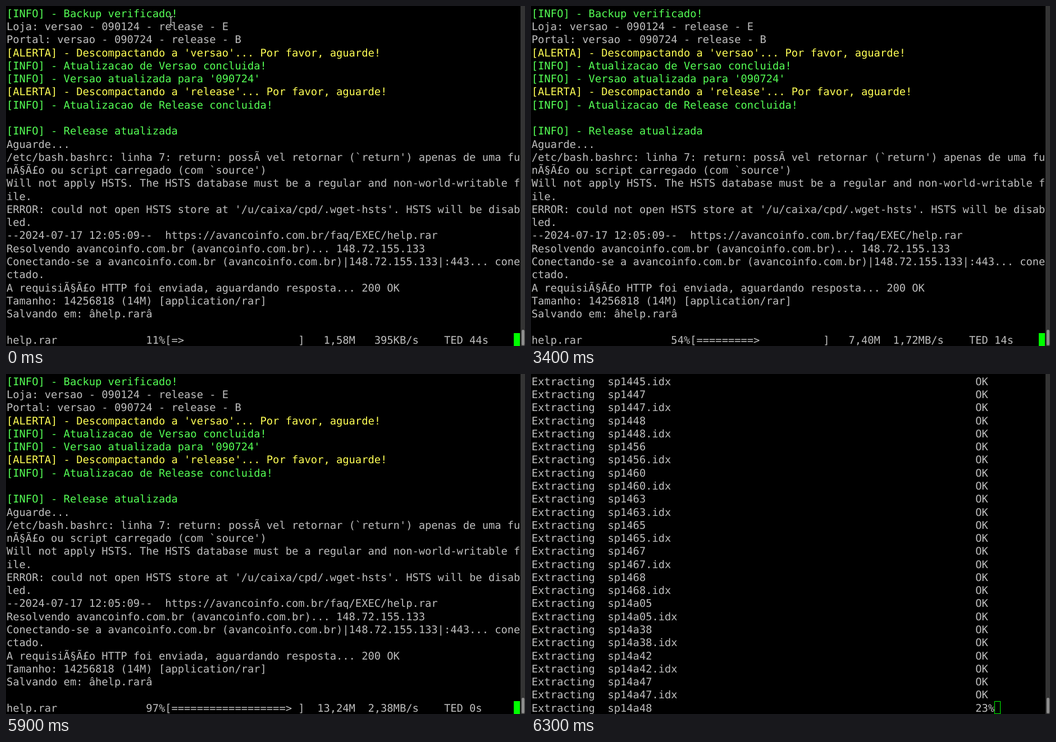
These frames come from a looping animation (924 px wide and 606 px high, 6.4 s). An HTML page:

```html
<!DOCTYPE html>
<html lang="pt-BR">
<head>
<meta charset="utf-8">
<title>Terminal</title>
<style>
  html, body { margin: 0; width: 100%; height: 100%; overflow: hidden; background: #000; }
  svg { display: block; width: 924px; height: 606px; }
  text {
    font: 18.753px "DejaVu Sans Mono", "Noto Sans Mono", monospace;
    font-variant-ligatures: none;
    text-rendering: geometricPrecision;
    white-space: pre;
  }
</style>
</head>
<body>
<svg id="stage" viewBox="0 0 924 606">
  <rect width="924" height="606" fill="#000"/>
  <g id="rows"></g>
  <rect id="cursor" width="11.3" height="23"/>
  <rect x="916" width="8" height="606" fill="#343434"/>
  <rect x="918" y="577" width="5" height="28" rx="2.5" fill="#8e8e8e"/>
  <g id="pointer" fill="none">
    <path d="M289.5 18.5q3.5 0 4 2q.5-2 4-2M293.5 20v13M289.5 34.5q3.5 0 4-2q.5 2 4 2" stroke="#000" stroke-width="3"/>
    <path d="M289.5 18.5q3.5 0 4 2q.5-2 4-2M293.5 20v13M289.5 34.5q3.5 0 4-2q.5 2 4 2" stroke="#ddd" stroke-width="1.2"/>
  </g>
</svg>
<script>
const LOOP = 6400, ROWS = 26, CELL_W = 11.29, CELL_H = 23.28, LEFT = 1;
const TOTAL_MB = 13.596, BAR_WIDTH = 20;
const byId = id => document.getElementById(id);

const log = `[INFO] - Backup verificado!
Loja: versao - 090124 - release - E
Portal: versao - 090724 - release - B
[ALERTA] - Descompactando a 'versao'... Por favor, aguarde!
[INFO] - Atualizacao de Versao concluida!
[INFO] - Versao atualizada para '090724'
[ALERTA] - Descompactando a 'release'... Por favor, aguarde!
[INFO] - Atualizacao de Release concluida!

[INFO] - Release atualizada
Aguarde...
/etc/bash.bashrc: linha 7: return: possÃ vel retornar (\`return') apenas de uma fu
nÃ§Ã£o ou script carregado (com \`source')
Will not apply HSTS. The HSTS database must be a regular and non-world-writable f
ile.
ERROR: could not open HSTS store at '/u/caixa/cpd/.wget-hsts'. HSTS will be disab
led.
--2024-07-17 12:05:09--  https://avancoinfo.com.br/faq/EXEC/help.rar
Resolvendo avancoinfo.com.br (avancoinfo.com.br)... 148.72.155.133
Conectando-se a avancoinfo.com.br (avancoinfo.com.br)|148.72.155.133|:443... cone
ctado.
A requisiÃ§Ã£o HTTP foi enviada, aguardando resposta... 200 OK
Tamanho: 14256818 (14M) [application/rar]
Salvando em: âhelp.rarâ
`.split("\n");

// [start ms, megabytes received, speed]
const progress = [
  [0, 1.58, "395KB/s"], [200, 1.86, "456KB/s"], [500, 2.17, "523KB/s"],
  [800, 2.48, "597KB/s"], [1100, 2.83, "684KB/s"], [1500, 3.37, "831KB/s"],
  [1800, 3.89, "946KB/s"], [2100, 4.45, "1,07MB/s"], [2400, 5.06, "1,22MB/s"],
  [3400, 7.40, "1,72MB/s"], [3700, 7.92, "1,83MB/s"], [4000, 8.48, "1,94MB/s"],
  [4200, 9.06, "2,01MB/s"], [4500, 9.68, "2,08MB/s"], [4700, 10.24, "2,14MB/s"],
  [5000, 10.82, "2,19MB/s"], [5200, 11.41, "2,25MB/s"], [5500, 12.02, "2,29MB/s"],
  [5700, 12.63, "2,34MB/s"], [5900, 13.24, "2,38MB/s"]
];
const remaining = [[0, 44], [1100, 26], [2400, 14], [3700, 7], [4700, 3], [5900, 0]];

const range = (first, step) => Array.from({ length: 13 }, (_, i) => String(first + i * step));
// [start ms, previous archive, archives, percent]
const pages = [
  [6100, "1008", range(1010, 3), 7],
  [6200, "1226", range(1229, 4), 15],
  [6300, "1445", "1447 1448 1456 1460 1463 1465 1467 1468 14a05 14a38 14a42 14a47 14a48".split(" "), 23]
];

const latest = (list, t) => list.filter(([start]) => start <= t).pop();

function downloadLine(mb, speed, tail) {
  const share = Math.min(1, mb / TOTAL_MB);
  const bar = ">".padStart(Math.floor(share * BAR_WIDTH), "=");
  const size = mb.toFixed(2).replace(".", ",") + "M";
  return "help.rar".padEnd(21) + `${Math.floor(share * 100)}%`.padStart(4) +
    `[${bar.padEnd(BAR_WIDTH)}]  ${size.padStart(6)}${speed.padStart(10)}    ${tail}`;
}

function extractionLines([, previous, archives, percent]) {
  const names = [previous + ".idx", ...archives.flatMap(a => [a, a + ".idx"])].slice(0, ROWS);
  return names.map((name, i) =>
    ("Extracting  sp" + name).padEnd(70) + (i < ROWS - 1 ? "OK" : `${percent}%`.padStart(3)));
}

function screenAt(t) {
  if (t >= 6100) {
    return { lines: extractionLines(latest(pages, t)), column: 73, hollow: t >= 6300 };
  }
  if (t >= 6000) {
    const lines = [...log.slice(4), downloadLine(13.6, "2,46MB/s", "em 12s"), "",
      "2024-07-17 12:05:21 (1,14 MB/s) - âhelp.rarâ", "", ""];
    return { lines, column: 0 };
  }
  const [, mb, speed] = latest(progress, t);
  const tail = `TED ${latest(remaining, t)[1]}s`;
  return { lines: [...log, downloadLine(mb, speed, tail)], column: 80 };
}

const colorOf = line =>
  line.startsWith("[INFO]") ? "#55ff55" : line.startsWith("[ALERTA]") ? "#ffff55" : "#bebebe";

const rows = Array.from({ length: ROWS }, (_, i) => {
  const row = document.createElementNS("http://www.w3.org/2000/svg", "text");
  row.setAttribute("x", LEFT);
  row.setAttribute("y", 19.7 + i * CELL_H);
  return byId("rows").appendChild(row);
});

function render(t) {
  const { lines, column, hollow } = screenAt(t);
  rows.forEach((row, i) => {
    if (row.textContent === lines[i]) return;
    row.textContent = lines[i];
    row.setAttribute("fill", colorOf(lines[i]));
  });
  const cursor = byId("cursor");
  const inset = hollow ? 0.5 : 0;
  cursor.setAttribute("x", Math.round(LEFT + column * CELL_W) + inset);
  cursor.setAttribute("y", 583 + inset);
  cursor.setAttribute("width", hollow ? 10 : 11);
  cursor.setAttribute("height", hollow ? 22 : 23);
  cursor.setAttribute("fill", hollow ? "none" : "#00ff00");
  cursor.setAttribute("stroke", hollow ? "#00ff00" : "none");
  byId("pointer").setAttribute("visibility", t < 1100 ? "visible" : "hidden");
}

const began = performance.now();
function tick() {
  render((performance.now() - began) % LOOP);
  requestAnimationFrame(tick);
}
tick();
</script>
</body>
</html>
```
